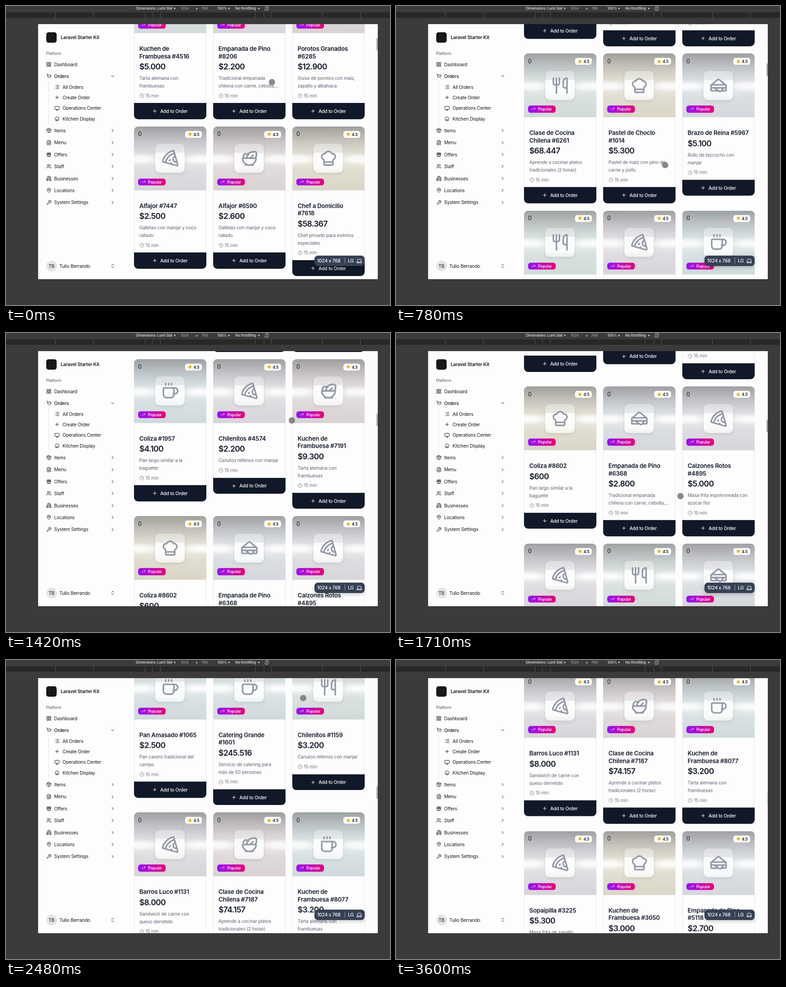
Animation of 849 by 660 pixels, one loop 3620 ms. Source, as an HTML page:

```html
<!DOCTYPE html>
<html lang="en">
<head>
<meta charset="utf-8">
<title>Order menu scroll</title>
<style>
  html, body { margin: 0; width: 100%; height: 100%; overflow: hidden; background: #3b3b3b; }
  body { position: relative; font: 10.27px/16px Inter, "Open Sans", sans-serif; letter-spacing: -.02em; color: #18181b; }
  div, svg { box-sizing: border-box; }
  .abs { position: absolute; white-space: nowrap; }
  svg { fill: none; stroke: currentColor; stroke-width: 2; stroke-linecap: round; stroke-linejoin: round; flex: none; }
  .tool { font-size: 8.1px; font-weight: 500; color: #e4e4e4; }
  .dim { color: #9b9b9b; }
  .tick { width: 1px; height: 12px; background: #555; }
  #view { left: 71px; top: 40px; width: 751px; height: 563px; background: #fdfdfd; overflow: hidden; }
  #page { left: -71px; top: -40px; width: 849px; height: 660px; }
  .card { width: 160px; border-radius: 9px; overflow: hidden; background: #fdfdfd; }
  .photo { position: relative; height: 141px; }
  .photo::before { content: ""; position: absolute; inset: 0; background:
    radial-gradient(44px 13px at 14px 72px, #fffb 35%, #fff0),
    radial-gradient(44px 13px at 146px 72px, #fffb 35%, #fff0),
    linear-gradient(#7f7f82a0, #a8a8ac70 22%, #ececf050 42%, #fff8 52%, #f0f0f240 68%, #d0d0d430); }
  .tile { left: 47.5px; top: 38.5px; width: 65px; height: 64px; border-radius: 10px; color: #9198a4;
    background: linear-gradient(#ffffff59 31%, #ffffffd8 31% 82%, #fff9); box-shadow: 0 3px 7px #00000016;
    display: flex; align-items: center; justify-content: center; }
  .zero { left: 9.5px; top: 9.5px; font-size: 12.5px; }
  .rate { right: 9.5px; top: 10px; width: 37px; height: 15px; border-radius: 5px; background: #fff;
    font: 600 8.8px/15px Inter, sans-serif; padding-left: 18.5px; }
  .rate svg { position: absolute; left: 5.5px; top: 2.5px; color: #f0b100; fill: #f0b100; }
  .hot { left: 9.5px; top: 115.3px; width: 61px; height: 15.5px; border-radius: 5.5px; color: #fff; padding-left: 22px;
    font: 500 8.8px/15.5px Inter, sans-serif; background: linear-gradient(90deg, #9810fa, #e60076); }
  .hot svg { position: absolute; left: 7px; top: 3.2px; }
  .info { padding: 26.2px 0 8.5px 12.3px; white-space: nowrap; box-shadow: inset 1px 0 #e4e6ea, inset -1px 0 #e4e6ea; }
  .name { font-size: 13.2px; font-weight: 600; line-height: 16.5px; color: #111827; }
  .price { margin-top: 3.2px; font-size: 17.6px; font-weight: 600; line-height: 23px; letter-spacing: -.04em; color: #111827; }
  .desc { margin-top: 6px; line-height: 16.75px; color: #5d6573; }
  .time { margin-top: 6px; display: flex; align-items: center; gap: 3px; line-height: 15px; color: #6f7683; }
  .add { height: 35.5px; background: #111827; color: #fff; font-weight: 500;
    display: flex; align-items: center; justify-content: center; gap: 6px; }
  #thumb { left: 819px; width: 3px; height: 27px; background: #777; }
  #size { left: 682px; top: 551px; width: 110.5px; height: 23px; border-radius: 7.5px; background: #364153;
    color: #fff; font-weight: 500; line-height: 23px; box-shadow: 0 3px 8px #0003; }
  #touch { width: 14px; height: 14px; margin: -7px; border-radius: 50%; background: #747476d8; }
</style>
</head>
<body>
<script>
const LOOP = 3620, PITCH = 346.5;

const glyphs = {
  utensils: "M3 2v7c0 1.1.9 2 2 2h4a2 2 0 0 0 2-2V2M7 2v20M21 15V2a5 5 0 0 0-5 5v6c0 1.1.9 2 2 2h3Zm0 0v7",
  pizza: "m12 14-1 1m2.75 3.25-1.25 1.42M17.8 5.65a15.7 15.7 0 0 0-12.1 12.1M18.8 9.3a1 1 0 0 0 2.1 7.7M22 20.7a1 1 0 0 1-1.2 1.2l-18-5a1 1 0 0 1-.7-1.2A19.7 19.7 0 0 1 15.7 2a1 1 0 0 1 1.2.7z",
  hat: "M17 21a1 1 0 0 0 1-1v-5.35c0-.46.32-.84.73-1.04a4 4 0 0 0-2.14-7.59 5 5 0 0 0-9.18 0 4 4 0 0 0-2.14 7.59c.41.2.73.58.73 1.04V20a1 1 0 0 0 1 1ZM6 17h12",
  bowl: "M7 21h10M12 21a9 9 0 0 0 9-9H3a9 9 0 0 0 9 9ZM11.4 12a2.4 2.4 0 0 1-.4-4.8 2.4 2.4 0 0 1 3.2-2.7 2.4 2.4 0 0 1 3.5-.7 2.4 2.4 0 0 1 3.3 3.4 2.4 2.4 0 0 1-1.1 3.7v1.1M13 12l4-4M10.9 7.2A4 4 0 0 0 4 10q0 1 .5 2",
  cup: "M10 2v2M14 2v2M6 2v2M16 8a1 1 0 0 1 1 1v8a4 4 0 0 1-4 4H7a4 4 0 0 1-4-4V9a1 1 0 0 1 1-1h14a4 4 0 1 1 0 8h-2",
  sandwich: "m2.4 11.2 8.3-6.8a2 2 0 0 1 2.6 0l8.3 6.8M21 15a1 1 0 0 1 1 1v2a1 1 0 0 1-1 1h-5.2M3 15a1 1 0 0 0-1 1v2a1 1 0 0 0 1 1h9M6.7 15l6.1 4.6a2 2 0 0 0 2.8-.4l3.1-4.2M3 11h18a1 1 0 0 1 1 1v2a1 1 0 0 1-1 1H3a1 1 0 0 1-1-1v-2a1 1 0 0 1 1-1",
  grid: "M3 3h7v7H3zM14 3h7v7h-7zM14 14h7v7h-7zM3 14h7v7H3z",
  cart: "M2 2h2l3 12.5a2 2 0 0 0 2 1.5h9.5a2 2 0 0 0 2-1.6L22 7H5M8 21h.1M19 21h.1",
  list: "M3 5h.1M3 12h.1M3 19h.1M8 5h13M8 12h13M8 19h13",
  plus: "M5 12h14M12 5v14",
  monitor: "M4 3h16a2 2 0 0 1 2 2v10a2 2 0 0 1-2 2H4a2 2 0 0 1-2-2V5a2 2 0 0 1 2-2ZM8 21h8M12 17v4",
  box: "m12 2 9 5v10l-9 5-9-5V7zM3 7l9 5 9-5M12 12v10M7.5 4.5l9 5",
  file: "M15 2H6a2 2 0 0 0-2 2v16a2 2 0 0 0 2 2h12a2 2 0 0 0 2-2V7zM14 2v6h6M8 9h2M8 13h8M8 17h8",
  gift: "M3 8h18v4H3zM12 8v13M19 12v9H5v-9M7.5 8a2.5 2.5 0 0 1 0-5Q11 3 12 8q1-5 4.5-5a2.5 2.5 0 0 1 0 5",
  users: "M16 21v-2a4 4 0 0 0-4-4H6a4 4 0 0 0-4 4v2M13 7a4 4 0 1 1-8 0 4 4 0 0 1 8 0M22 21v-2a4 4 0 0 0-3-3.9M16 3.1a4 4 0 0 1 0 7.8",
  building: "M6 22V4a2 2 0 0 1 2-2h8a2 2 0 0 1 2 2v18zM6 12H4a2 2 0 0 0-2 2v8h4M18 9h2a2 2 0 0 1 2 2v11h-4M10 6h4M10 10h4M10 14h4M10 18h4",
  pin: "M20 10c0 5-5.5 10-8 12-2.5-2-8-7-8-12a8 8 0 0 1 16 0M15 10a3 3 0 1 1-6 0 3 3 0 0 1 6 0",
  wrench: "M14.7 6.3a1 1 0 0 0 0 1.4l1.6 1.6a1 1 0 0 0 1.4 0l3.8-3.8a6 6 0 0 1-8 8l-6.9 6.9a2 2 0 0 1-3-3l6.9-6.9a6 6 0 0 1 8-8z",
  right: "m9 18 6-6-6-6",
  down: "m6 9 6 6 6-6",
  updown: "m7 15 5 5 5-5M7 9l5-5 5 5",
  clock: "M22 12a10 10 0 1 1-20 0 10 10 0 0 1 20 0M12 6v6l4 2",
  trend: "M16 7h6v6M22 7l-8.5 8.5-5-5L2 17",
  star: "m12 2 3 6.5 7 .8-5.2 4.8 1.5 7L12 17.6 5.7 21l1.5-7L2 9.3l7-.8z",
  laptop: "M4 16V6a2 2 0 0 1 2-2h12a2 2 0 0 1 2 2v10M2 16h20v4H2z",
  rotate: "M9 2 4 7l11 15 5-5zM15 2q6 1 7 7M9 22q-6-1-7-7"
};
const icon = (name, size = 11.7) =>
  `<svg width="${size}" height="${size}" viewBox="0 0 24 24"><path d="${glyphs[name]}"/></svg>`;
const at = (x, y, html, cls = "", css = "") =>
  `<div class="abs ${cls}" style="left:${x}px;top:${y}px;${css}">${html}</div>`;
const label = (x, y, text, css) => at(x, y - 8, text, "", css);
const iconAt = (x, y, name, size = 11.7) => at(x - size / 2, y - size / 2, icon(name, size), "", "line-height:0");
const lines = text => text.replace("|", "<br>");

// Dish name (its id follows) and description; "|" breaks the line.
const dishes = {
  kuchen: ["Kuchen de|Frambuesa ", "Tarta alemana con|frambuesas"],
  empanada: ["Empanada de Pino|", "Tradicional empanada|chilena con carne, cebolla,…"],
  porotos: ["Porotos Granados|", "Guiso de porotos con maíz,|zapallo y albahaca"],
  alfajor: ["Alfajor ", "Galletas con manjar y coco|rallado"],
  chef: ["Chef a Domicilio|", "Chef privado para eventos|especiales"],
  clase: ["Clase de Cocina|Chilena ", "Aprende a cocinar platos|tradicionales (2 horas)"],
  choclo: ["Pastel de Choclo|", "Pastel de maíz con pino de|carne y pollo"],
  brazo: ["Brazo de Reina ", "Rollo de bizcocho con|manjar"],
  soda: ["Nilva 350ml ", "Bebida gaseosa sabor|naranja"],
  catering: ["Catering Grande|", "Servicio de catering para|más de 50 personas"],
  hallulla: ["Hallulla ", "Pan redondo suave perfecto|para sandwiches"],
  sopaipilla: ["Sopaipilla ", "Masa frita de zapallo,|perfecta con pebre"],
  coliza: ["Coliza ", "Pan largo similar a la|baguette"],
  calzones: ["Calzones Rotos|", "Masa frita espolvoreada con|azúcar flor"],
  amasado: ["Pan Amasado ", "Pan casero tradicional del|campo"],
  chilenitos: ["Chilenitos ", "Canutos rellenos con manjar"],
  barros: ["Barros Luco ", "Sandwich de carne con|queso derretido"]
};
const tints = { utensils: "#d2ddda", pizza: "#d8d7db", hat: "#dcd8c6", bowl: "#dbd3d3", cup: "#d0dcde", sandwich: "#d5d9dd" };

// One row per line: icon, dish, id, price. Missing ids and prices are generated.
const menu = `
utensils kuchen 4516 5.000, pizza empanada 8206 2.200, bowl porotos 6285 12.900
pizza alfajor 7447 2.500, bowl alfajor 6590 2.600, hat chef 7618 58.367
cup soda, sandwich barros, utensils choclo
sandwich hallulla, pizza empanada, hat calzones
utensils clase 6261 68.447, hat choclo 1014 5.300, sandwich brazo 5967 5.100
utensils soda 8050 3.400, pizza catering 7949 442.933, cup hallulla 5175 1.400
pizza sopaipilla 4185 7.000, pizza porotos 5199 5.600, hat porotos 3783 7.300
cup coliza, pizza chilenitos, bowl kuchen
hat coliza 8602 600, sandwich empanada 6368 2.800, pizza calzones 4895 5.000
pizza alfajor, utensils porotos, sandwich barros
cup amasado, hat chef, pizza brazo
bowl clase, sandwich hallulla, cup choclo
pizza calzones, utensils soda, hat empanada
cup amasado 1065 2.500, cup catering 1601 245.516, utensils chilenitos 1159 3.200
pizza barros 1131 8.000, bowl clase 7187 74.157, cup kuchen 8077 3.200
pizza sopaipilla 3225 5.300, hat kuchen 3050 3.000, sandwich empanada 5118 2.700`;

function card(entry, row, col) {
  const seed = row * 3 + col;
  const [art, dish, id = 1000 + seed * 2617 % 9000, price = `${1 + seed * 7 % 9}.${seed % 10}00`] = entry.split(" ");
  const [name, desc] = dishes[dish];
  return at(282.5 + col * 175, 265.5 + (row - 1) * PITCH, `
    <div class="photo" style="background:${tints[art]}">
      <div class="abs zero">0</div>
      <div class="abs rate">${icon("star", 9.5)}4.5</div>
      <div class="abs tile">${icon(art, 40)}</div>
      <div class="abs hot">${icon("trend", 9)}Popular</div>
    </div>
    <div class="info">
      <div class="name">${lines(name)}#${id}</div>
      <div class="price">$${price}</div>
      <div class="desc">${lines(desc)}</div>
      <div class="time">${icon("clock", 10.5)}15 min</div>
    </div>
    <div class="add">${icon("plus")}Add to Order</div>`, "card");
}
const cards = menu.trim().split("\n").flatMap((line, row) => line.split(", ").map((entry, col) => card(entry, row, col)));

const main = "Items box,Menu file,Offers gift,Staff users,Businesses building,Locations pin,System_Settings wrench".split(",");
const sub = "All_Orders list,Create_Order plus,Operations_Center monitor,Kitchen_Display hat".split(",");
const link = (x, y, entry, css) => {
  const [text, art] = entry.split(" ");
  return iconAt(x, y, art) + label(x + 12, y, text.replace("_", " "), css);
};
const sidebar =
  at(89, 57.5, "", "", "width:23px;height:23.5px;border-radius:5px;background:#18181b") +
  label(121, 69, "Laravel Starter Kit", "font-weight:600") +
  label(88.5, 104.5, "Platform", "font-size:9px;color:#5b5b60") +
  link(94.5, 128.5, "Dashboard grid") + link(94.5, 155, "Orders cart", "font-weight:500") + iconAt(235.5, 155, "down") +
  at(94, 166, "", "", "width:1px;height:95px;background:#e5e5e5") +
  sub.map((entry, i) => link(113, 178.5 + i * 23.45, entry)).join("") +
  main.map((entry, i) => link(94.5, 275 + i * 26.4, entry) + iconAt(235.5, 275 + i * 26.4, "right")).join("") +
  at(88.5, 562, "TB", "", "width:24px;height:24px;border-radius:50%;background:#e5e5e5;line-height:24px;text-align:center") +
  label(118, 574, "Tulio Berrando") + iconAt(235.5, 574, "updown");

const tool = (x, text, cls = "") => at(x, -3, text, "tool " + cls);
const toolbar =
  tool(287, "Dimensions: Lumi Slat") + tool(386, "1024", "dim") + tool(419, "×") + tool(432, "768", "dim") +
  tool(467.5, "100%") + tool(507, "No throttling") +
  [374, 494, 560].map(x => at(x - 2.8, 3.5, "", "", "border:2.8px solid transparent;border-top:4.5px solid #ddd")).join("") +
  at(570.5, -.5, icon("rotate", 11), "", "color:#ddd;line-height:0") +
  at(0, 13.5, "", "", "width:849px;height:12.5px;background:#282828") +
  [109, 193, 307, 323, 341, 551, 570, 586, 699, 783].map(x => at(x, 14, "", "tick")).join("");

document.body.innerHTML = toolbar + `
  <div class="abs" id="view"><div class="abs" id="page">
    <div class="abs" id="list" style="left:0;top:0;will-change:transform">${cards.join("")}</div>
    ${sidebar}
    <div class="abs" id="thumb"></div>
    <div class="abs" id="size">${at(6, 0, "1024 x 768")}${at(65.5, 0, "|", "", "color:#99a1af")}${at(74, 0, "LG")}${at(93, 5.5, icon("laptop", 12), "", "line-height:0")}</div>
    <div class="abs" id="touch"></div>
  </div></div>
  <svg class="abs" id="arrow" width="12" height="18" viewBox="0 0 12 18"><path d="M1 1v12l3-2.5 2 4.5 2-1-2-4.3h4z" fill="#000" stroke="#fff" stroke-width="1"/></svg>`;

const [list, thumb, touch, arrow] = ["list", "thumb", "touch", "arrow"].map(id => document.getElementById(id));

// Each swipe drags from down to up, then coasts to rest at end (ms, px).
const swipes = [
  { down: 0, up: 30, end: 1012, rest: 1218 },
  { down: 1000, up: 1157, end: 2142, rest: 2650 },
  { down: 1840, up: 2060, end: 3162, rest: 4739.3 }
];
// Distance still to coast when ms remain: exponential decay plus a linear term.
const coast = ms => {
  const s = Math.max(0, ms) / 1000;
  return 34.1 * (Math.exp(3.7 * s) - 1) - 126 * s;
};
const position = (swipe, t) => swipe.rest - coast(swipe.end - t);

function scrollAt(t) {
  const n = swipes.findLastIndex(s => t >= s.down), swipe = swipes[n];
  if (t >= swipe.up) return position(swipe, t);
  const from = n ? position(swipes[n - 1], swipe.down) : 0;
  const p = (t - swipe.down) / (swipe.up - swipe.down);
  return from + (position(swipe, swipe.up) - from) * p * p;
}

// Pointer stops: time, x, y.
const stops = [[0, 588, 168], [30, 592, 82], [140, 598, 74], [777, 595, 350.5], [1000, 599, 363], [1157, 632, 78],
  [1188, 634, 74], [1717, 629, 360], [1840, 632, 372], [2060, 652, 92], [2480, 657, 84], [2620, 672, 110], [3008, 844, 585], [3090, 880, 700]];
function pointerAt(t) {
  const i = stops.findIndex(s => s[0] > t);
  if (i < 0) return stops.at(-1).slice(1);
  const [a, b] = [stops[i - 1], stops[i]];
  const p = (t - a[0]) / (b[0] - a[0]);
  const dragging = swipes.some(s => s.down === a[0]);
  const e = dragging ? p * p : t > 2620 ? p : p * p * (3 - 2 * p);
  return [1, 2].map(k => a[k] + (b[k] - a[k]) * e);
}

function draw() {
  const now = performance.now() % LOOP;
  const step = Math.floor((now - 65) / 58.7);
  const t = step < 0 ? 0 : 73 + step * 58.7;
  const scroll = scrollAt(t), [x, y] = pointerAt(t), inside = x < 822 && y < 603;
  list.style.transform = `translateY(${-scroll}px)`;
  thumb.style.top = 71 + scroll * 222 / 4739.3 + "px";
  thumb.style.opacity = .6 - .45 * Math.min(1, Math.max(0, (t - 3340) / 240));
  touch.style.display = inside ? "" : "none";
  arrow.style.display = inside ? "none" : "";
  for (const el of [touch, arrow]) {
    el.style.left = x + "px";
    el.style.top = y + "px";
  }
  requestAnimationFrame(draw);
}
draw();
</script>
</body>
</html>
```
